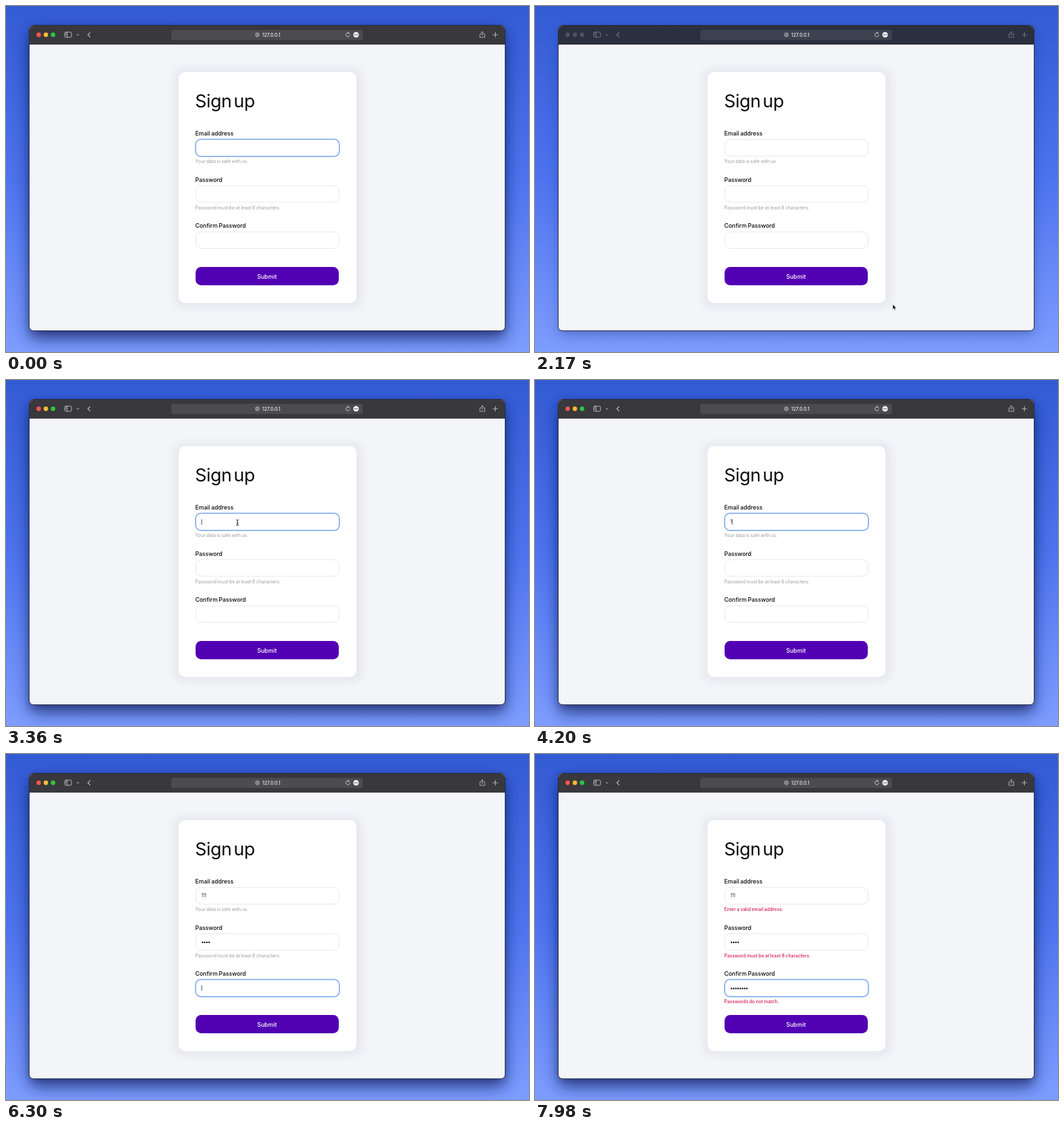
An HTML page that plays this animation: 800 by 529 pixels, repeating every 8000 ms.

```html
<!DOCTYPE html>
<html lang="en">
<head>
<meta charset="utf-8">
<title>Sign up form</title>
<style>
  html, body { margin: 0; width: 100%; height: 100%; overflow: hidden; }
  svg { display: block; width: 100vw; height: 100vh; }
  text { font-family: Inter, sans-serif; }
  .title { font-size: 27.5px; letter-spacing: -.4px; word-spacing: -4px; fill: #0b0b0d; }
  .label { font-size: 8.9px; font-weight: 500; word-spacing: -.6px; fill: #08080a; }
  .hint { font-size: 7px; word-spacing: -.35px; fill: #989aa6; }
  .hint.bad { font-weight: 500; fill: #d2184f; }
  .value { font-size: 7px; letter-spacing: -.4px; fill: #3c3c44; }
  .box { fill: #fff; stroke: #e8e8ee; stroke-width: 1; }
  .icon { fill: none; stroke: var(--icon); stroke-width: 1; stroke-linecap: round; stroke-linejoin: round; }
</style>
</head>
<body>
<svg viewBox="0 0 800 529" preserveAspectRatio="none">
  <defs>
    <linearGradient id="sky" x1="0" y1="0" x2="0" y2="1">
      <stop offset="0" stop-color="#335bd3"/>
      <stop offset=".5" stop-color="#4d73ee"/>
      <stop offset="1" stop-color="#7e9dff"/>
    </linearGradient>
    <filter id="wide" x="-20%" y="-20%" width="140%" height="140%"><feGaussianBlur stdDeviation="12"/></filter>
    <filter id="soft" x="-20%" y="-20%" width="140%" height="140%"><feGaussianBlur stdDeviation="6"/></filter>
  </defs>

  <rect width="800" height="529" fill="url(#sky)"/>
  <rect id="bigShadow" x="36" y="41" width="727" height="468" rx="9" fill="#101a58" filter="url(#wide)"/>
  <rect id="nearShadow" x="36" y="34" width="727" height="467" rx="8" fill="#14206a" filter="url(#soft)"/>

  <rect x="35.5" y="29.5" width="728" height="467" rx="6.5" fill="#f4f5f8" stroke="#262c48"/>
  <g id="bar">
    <path id="barBack" d="M36 59V36a6 6 0 0 1 6-6h715a6 6 0 0 1 6 6v23z"/>
    <g id="lights">
      <circle cx="50" cy="44" r="3.4"/><circle cx="61" cy="44" r="3.4"/><circle cx="72" cy="44" r="3.4"/>
    </g>
    <rect id="urlBox" x="253" y="36.5" width="293" height="15.5" rx="3.5"/>
    <g class="icon">
      <rect x="89.8" y="40" width="10.4" height="7.8" rx="1.6"/>
      <path d="M93.4 40v7.8M91 42h1M91 44h1"/>
      <path d="M108.5 43.4l1.6 1.5 1.6-1.5"/>
      <path d="M128.6 40.6l-3.4 3.4 3.4 3.4" stroke-width="1.2"/>
      <path d="M726.8 42.7h-1.9v5.3h7.4v-5.3h-1.9M728.6 45.3v-6M726.7 41l1.9-1.9 1.9 1.9" stroke-width=".9"/>
      <path d="M748.5 40.4v7.2M744.9 44h7.2"/>
    </g>
    <g fill="none" stroke="#a9aab0" stroke-width=".7">
      <circle cx="384.5" cy="44" r="3.2"/>
      <ellipse cx="384.5" cy="44" rx="1.4" ry="3.2"/>
      <path d="M381.3 44h6.4M381.9 42.3h5.2M381.9 45.7h5.2"/>
    </g>
    <text x="392" y="46.6" font-size="7.1" font-weight="500" fill="#f4f4f6">127.0.0.1</text>
    <path d="M525.6 42.6a3 3 0 1 0 .3 1.7M523 39.9l1.7 1.2-1.5 1.4" fill="none" stroke="#dcdce0" stroke-width=".9"/>
    <circle cx="535.5" cy="44" r="4.3" fill="#f2f2f4"/>
    <g fill="#45464c"><circle cx="533.4" cy="44" r=".8"/><circle cx="535.5" cy="44" r=".8"/><circle cx="537.6" cy="44" r=".8"/></g>
  </g>

  <rect x="256" y="95" width="289" height="367" rx="15" fill="#dcdce8" opacity=".5" filter="url(#soft)"/>
  <rect x="264" y="101" width="272" height="353" rx="10" fill="#fff"/>
  <text class="title" x="289.2" y="155">Sign up</text>
  <g id="form"></g>
  <rect x="290" y="399" width="219" height="28" rx="8.5" fill="#5200b3"/>
  <text x="399.2" y="416.6" font-size="9" font-weight="500" fill="#fff" text-anchor="middle">Submit</text>

  <g id="keycap">
    <rect x="374" y="442" width="53" height="40" rx="8.5" fill="#4c4c4e"/>
    <path d="M390 462.5h16M401.5 457.7l4.8 4.8-4.8 4.8M410 457v11" fill="none" stroke="#fff" stroke-width="2"/>
  </g>

  <circle id="pulse" r="9.7" fill="#e8ecf4" fill-opacity=".45" stroke="#b9c8e2" stroke-width=".8"/>
  <path id="beam" d="M-2-4.3q1.7 0 2 1.1q.3-1.1 2-1.1M0-3.2v6.4M-2 4.3q1.7 0 2-1.1q.3 1.1 2 1.1M-1.2.9h2.4" fill="none" stroke="#16181d" stroke-width="1"/>
  <path id="arrow" d="M0 0v8l1.8-1.6 1.2 2.7 1.4-.6-1.2-2.6h2.5z" fill="#0c0c0e" stroke="#fff" stroke-width=".6"/>
</svg>

<script>
const LOOP = 8000, BLUR = 70, CLICK = 2870, TAB1 = 5040, TAB2 = 6020, ERRORS = 7420;
const $ = id => document.getElementById(id);
const clamp = v => Math.max(0, Math.min(1, v));
const ramp = (t, from, to) => clamp((t - from) / (to - from));
const smooth = p => p * p * (3 - 2 * p);
const mix = (a, b, p) => a + (b - a) * p;
const show = (el, on) => el.setAttribute('opacity', +on);

const fields = [
  { label: 'Email address', y: 204, hint: 'Your data is safe with us.', error: 'Enter a valid email address.',
    start: 4130, gap: 130, max: 3, from: CLICK, to: TAB1 },
  { label: 'Password', y: 274.5, hint: 'Password must be at least 8 characters.', error: 'Password must be at least 8 characters.',
    start: 5530, gap: 90, max: 4, from: TAB1, to: TAB2, secret: true },
  { label: 'Confirm Password', y: 345, hint: '', error: 'Passwords do not match.',
    start: 6580, gap: 100, max: 8, from: TAB2, to: LOOP, secret: true }
];

function node(tag, attrs, text = '') {
  const el = document.createElementNS('http://www.w3.org/2000/svg', tag);
  for (const key in attrs) el.setAttribute(key, attrs[key]);
  el.textContent = text;
  $('form').append(el);
  return el;
}

for (const f of fields) {
  const y = f.y;
  node('text', { class: 'label', x: 289.5, y: y - 5.9 }, f.label);
  node('rect', { class: 'box', x: 290.3, y: y + .3, width: 219.2, height: 25.2, rx: 7.5 });
  f.ring = node('rect', { x: 290, y: y - .2, width: 220, height: 26.2, rx: 8,
    fill: '#fff', stroke: '#92b8f1', 'stroke-width': 2 });
  f.tip = node('text', { class: 'hint', x: 289.6, y: y + 36 });
  f.value = node('text', { class: 'value', x: 298.7, y: y + 15.1 });
  f.dots = [];
  for (let i = 0; f.secret && i < f.max; i++)
    f.dots.push(node('circle', { cx: 300.6 + 3.35 * i, cy: y + 13.5, r: 1.2, fill: '#111114' }));
  f.caret = node('rect', { y: y + 9, width: .9, height: 8, fill: '#2f4a7d' });
}

function drawField(f, t) {
  const focused = t >= f.from && t < f.to || f === fields[0] && t < BLUR;
  const count = t < f.start ? 0 : Math.min(f.max, 1 + Math.floor((t - f.start) / f.gap));
  const failed = t >= ERRORS;
  show(f.ring, focused);
  f.tip.textContent = failed ? f.error : f.hint;
  f.tip.classList.toggle('bad', failed);
  if (f.secret) f.dots.forEach((dot, i) => show(dot, i < count));
  else f.value.textContent = '1'.repeat(count);

  // The caret restarts its blink after each key.
  const last = count ? f.start + (count - 1) * f.gap : f.from;
  const lit = t >= f.from && Math.floor((t - last) / 500) % 2 === 0;
  show(f.caret, focused && lit);
  f.caret.setAttribute('x', 299 + count * (f.secret ? 3.35 : 2.5));
}

function drawWindow(t) {
  const active = t < BLUR || t >= CLICK;
  const depth = t < CLICK ? 1 - ramp(t, BLUR, 350) : 1;
  show($('bigShadow'), mix(.14, .68, depth));
  show($('nearShadow'), mix(.22, .34, depth));
  $('barBack').setAttribute('fill', active ? '#38383d' : '#2b303e');
  $('urlBox').setAttribute('fill', active ? '#4b4b50' : '#3d4250');
  $('bar').style.setProperty('--icon', active ? '#b9b9bd' : '#737987');
  const colors = active ? ['#f9564f', '#f8bc32', '#2dc840'] : Array(3).fill('#4c525f');
  [...$('lights').children].forEach((light, i) => light.setAttribute('fill', colors[i]));
}

function drawPointer(t) {
  let x = 354, y = 218;
  if (t < 2450) {
    const p = smooth(ramp(t, 1750, 2310));
    x = mix(806, 500, p);
    y = mix(500, 448, p);
  } else if (t < CLICK) {
    const p = smooth(ramp(t, 2450, 2800));
    x = mix(500, 354, p);
    y = mix(448, 218, p);
  } else if (t >= TAB1) {
    const p = smooth(ramp(t, TAB1, 5390));
    x = mix(354, 563, p);
    y = mix(218, 272.5, p);
  }
  const inField = x > 290 && x < 510 && fields.some(f => y > f.y && y < f.y + 26);
  const seen = t >= 1750 && t < fields[0].start || t >= TAB1 && t < fields[1].start;
  for (const id of ['beam', 'arrow', 'pulse']) $(id).setAttribute('transform', `translate(${x} ${y})`);
  show($('beam'), seen && inField);
  show($('arrow'), seen && !inField);
  show($('pulse'), t >= CLICK ? 1 - ramp(t, 2960, 3150) : 0);
}

function draw(t) {
  drawWindow(t);
  fields.forEach(f => drawField(f, t));
  drawPointer(t);
  show($('keycap'), ramp(t, TAB1 - 70, TAB1 + 70) * (1 - ramp(t, 5600, 5810)));
}

const begin = performance.now();
function tick() {
  draw((performance.now() - begin) % LOOP);
  requestAnimationFrame(tick);
}
tick();
</script>
</body>
</html>
```
